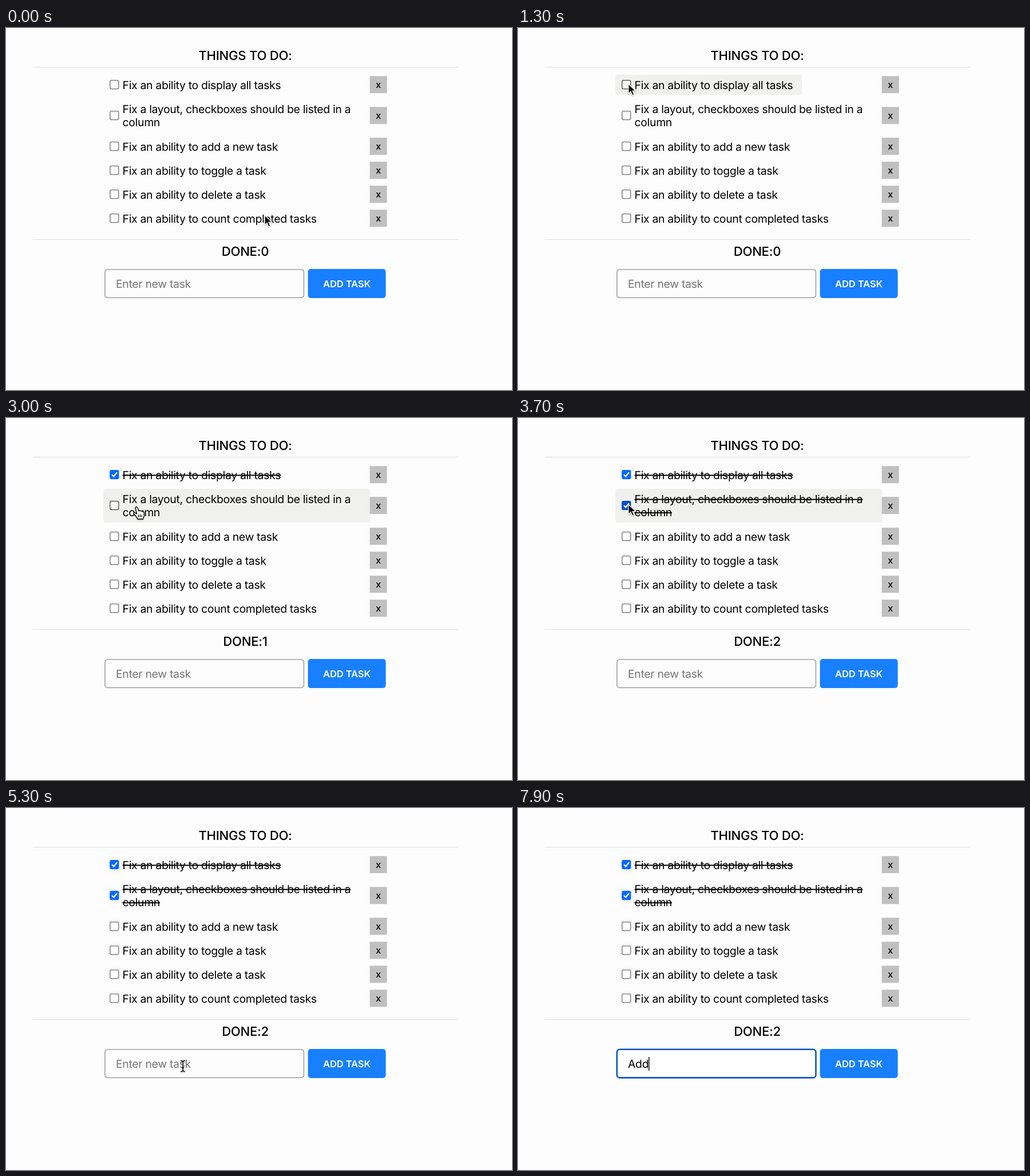
Recreate the animation shown at these times as an HTML page. Size 884x634 px, loop 8000 ms.

```html
<!DOCTYPE html>
<html lang="en">
<head>
<meta charset="utf-8">
<title>Things to do</title>
<style>
  html, body { margin: 0; width: 100%; height: 100%; overflow: hidden; background: #fdfdfd; }
  svg { display: block; width: 884px; height: 634px; }
  text {
    font: 19.4px Inter, sans-serif; letter-spacing: -.31px; font-optical-sizing: none;
    text-rendering: geometricPrecision; fill: #000;
  }
  .heading { font-size: 22px; font-weight: 500; letter-spacing: -.2px; text-anchor: middle; }
  .small { font-size: 16.4px; font-weight: 500; letter-spacing: 0; text-anchor: middle; }
  .add { font-weight: 600; fill: #fff; }
  .rule { stroke: #dedee2; }
  .highlight { fill: #f0f0ef; visibility: hidden; }
  .box { fill: #fff; stroke: #707070; stroke-width: 1.3; }
  .tick { fill: none; stroke: #fff; stroke-width: 2.2; visibility: hidden; }
  .hover .highlight, .done .tick { visibility: visible; }
  .hover .box { stroke: #444; }
  .done .box { fill: #0069ff; stroke: #0069ff; }
  .done.hover .box { fill: #0050c0; stroke: #0050c0; }
  .done .label { text-decoration: line-through; }
  #field { fill: #fdfdfd; stroke: #8f8f93; stroke-width: 1.3; }
  #field.focus { fill: #fff; stroke: #0a55c4; stroke-width: 2.6; }
  #cursor { filter: drop-shadow(0 1px 1px #0005); }
</style>
</head>
<body>
<svg viewBox="0 0 884 634">
  <text class="heading" x="418" y="56">THINGS TO DO:</text>
  <path class="rule" d="M47 68.5H790M47 370.5H790"/>
  <g id="list"></g>
  <text class="heading" id="count" x="418" y="399"></text>
  <rect id="field" x="172.8" y="422.8" width="347.6" height="49.6" rx="5"/>
  <text id="entry" x="192" y="455"></text>
  <path id="caret" stroke="#000" stroke-width="1.4" d="M.6 436V460"/>
  <rect x="527.5" y="422" width="136" height="51" rx="5" fill="#1880ff"/>
  <text class="small add" x="595.5" y="453.6">ADD TASK</text>
  <g id="cursor">
    <path id="arrow" d="M0 0V17L4 13.3L6.8 19.8L9.7 18.5L7 12.2H12.6Z" stroke="#fff" stroke-width="1.2"/>
    <g id="hand" fill="#fff" stroke="#000" stroke-width="1.3" stroke-linejoin="round">
      <path d="M-2 1.5a2 2 0 0 1 3.8-.6L4 7c1-1.4 3-1 3.4.4 1-1 2.8-.6 3.2.8 1.4-.5 2.6.3 2.6 2v4.5c0 2.5-1.6 3.5-1.8 6.3H2c-.6-3-4.5-6.5-6.6-8.9-1.3-1.7 1-3 3-1.4L.5 12z"/>
      <path d="M3.6 13v5M6.3 13v5M9 13v5" stroke-width="1.1"/>
    </g>
    <g id="beam" fill="none">
      <path d="M-4-9.5Q0-9.5 0-7Q0-9.5 4-9.5M0-7V7M-4 9.5Q0 9.5 0 7Q0 9.5 4 9.5M-2 3H2" stroke="#fff" stroke-width="3"/>
      <path d="M-4-9.5Q0-9.5 0-7Q0-9.5 4-9.5M0-7V7M-4 9.5Q0 9.5 0 7Q0 9.5 4 9.5M-2 3H2" stroke="#000" stroke-width="1.5"/>
    </g>
  </g>
</svg>
<script>
const LOOP = 8000, STEP = 100;
const FIRST_MOVE = 700, FOCUS = 5600, TYPING = 7300;
const $ = id => document.getElementById(id);

const rows = [
  { y: 99, right: 496, lines: ["Fix an ability to display all tasks"], doneAt: 1500 },
  { y: 153, right: 636, lines: ["Fix a layout, checkboxes should be listed in a", "column"], doneAt: 3700 },
  { y: 207, right: 490, lines: ["Fix an ability to add a new task"] },
  { y: 249, right: 471, lines: ["Fix an ability to toggle a task"] },
  { y: 291, right: 470, lines: ["Fix an ability to delete a task"] },
  { y: 333, right: 560, lines: ["Fix an ability to count completed tasks"] }
];

// time, x, y of the pointer
const route = [
  [0, 452, 328], [600, 452, 328], [1200, 193, 98], [1700, 193, 98],
  [2100, 430, 94], [2500, 557, 120], [3000, 228, 156], [3400, 193, 151],
  [4200, 193, 152], [4600, 192, 175], [5300, 309, 452], [5600, 311, 458], [LOOP, 311, 458]
];

const typed = [[7300, "A"], [7600, "Ad"], [7800, "Add"]];
const caretOn = [[FOCUS, 6100], [6500, 7000], [TYPING, LOOP]];

rows.forEach(row => {
  const { y, right, lines } = row;
  row.half = lines.length > 1 ? 29.5 : 17.75;
  const first = y + 7.7 - (lines.length - 1) * 11.7;
  const labels = lines.map((line, i) =>
    `<text class="label" x="203.5" y="${first + i * 23.4}">${line}</text>`).join("");
  $("list").insertAdjacentHTML("beforeend", `<g>
    <rect class="highlight" x="170.5" y="${y + .4 - row.half}" width="${right - 170.5}" height="${row.half * 2}" rx="4"/>
    <rect class="box" x="181.8" y="${y - 7.4}" width="15" height="15" rx="2.6"/>
    <path class="tick" d="M185 ${y + .3}l3.2 3.2 5.8-7.2"/>${labels}
    <rect x="635.5" y="${y - 14.8}" width="30" height="30" fill="#c0c0c0"/>
    <text class="small" x="650.5" y="${y + 5.8}">x</text></g>`);
  row.node = $("list").lastElementChild;
});

function pointerAt(t) {
  const i = route.findIndex((key, k) => k && t <= key[0]);
  const [t0, x0, y0] = route[i - 1], [t1, x1, y1] = route[i];
  const p = (t - t0) / (t1 - t0), e = p * p * (3 - 2 * p);
  return [x0 + (x1 - x0) * e, y0 + (y1 - y0) * e];
}

const show = (node, on) => node.setAttribute("visibility", on ? "visible" : "hidden");

function draw(t) {
  const [x, y] = pointerAt(t);
  let overLabel = false, done = 0;
  for (const row of rows) {
    const hover = t >= FIRST_MOVE && x > 170 && x < row.right && Math.abs(y - row.y) < row.half;
    const checked = t >= row.doneAt;
    row.node.classList.toggle("hover", hover);
    row.node.classList.toggle("done", checked);
    overLabel ||= hover && x > 200;
    done += checked;
  }
  $("count").textContent = "DONE:" + done;

  const word = typed.filter(([at]) => t >= at).pop()?.[1];
  $("field").classList.toggle("focus", t >= FOCUS);
  $("entry").textContent = word || "Enter new task";
  $("entry").style.fill = word ? "#000" : "#757575";
  const end = word ? $("entry").getComputedTextLength() : 0;
  $("caret").setAttribute("transform", `translate(${192 + end} 0)`);
  show($("caret"), caretOn.some(([from, to]) => t >= from && t < to));

  const shape = y > 422 ? "beam" : overLabel ? "hand" : "arrow";
  $("cursor").setAttribute("transform", `translate(${x} ${y})`);
  for (const id of ["arrow", "hand", "beam"]) show($(id), id === shape && t < TYPING);
}

const start = performance.now();
function tick() {
  const t = (performance.now() - start) % LOOP;
  draw(Math.floor(t / STEP) * STEP);
  requestAnimationFrame(tick);
}
tick();
</script>
</body>
</html>
```
